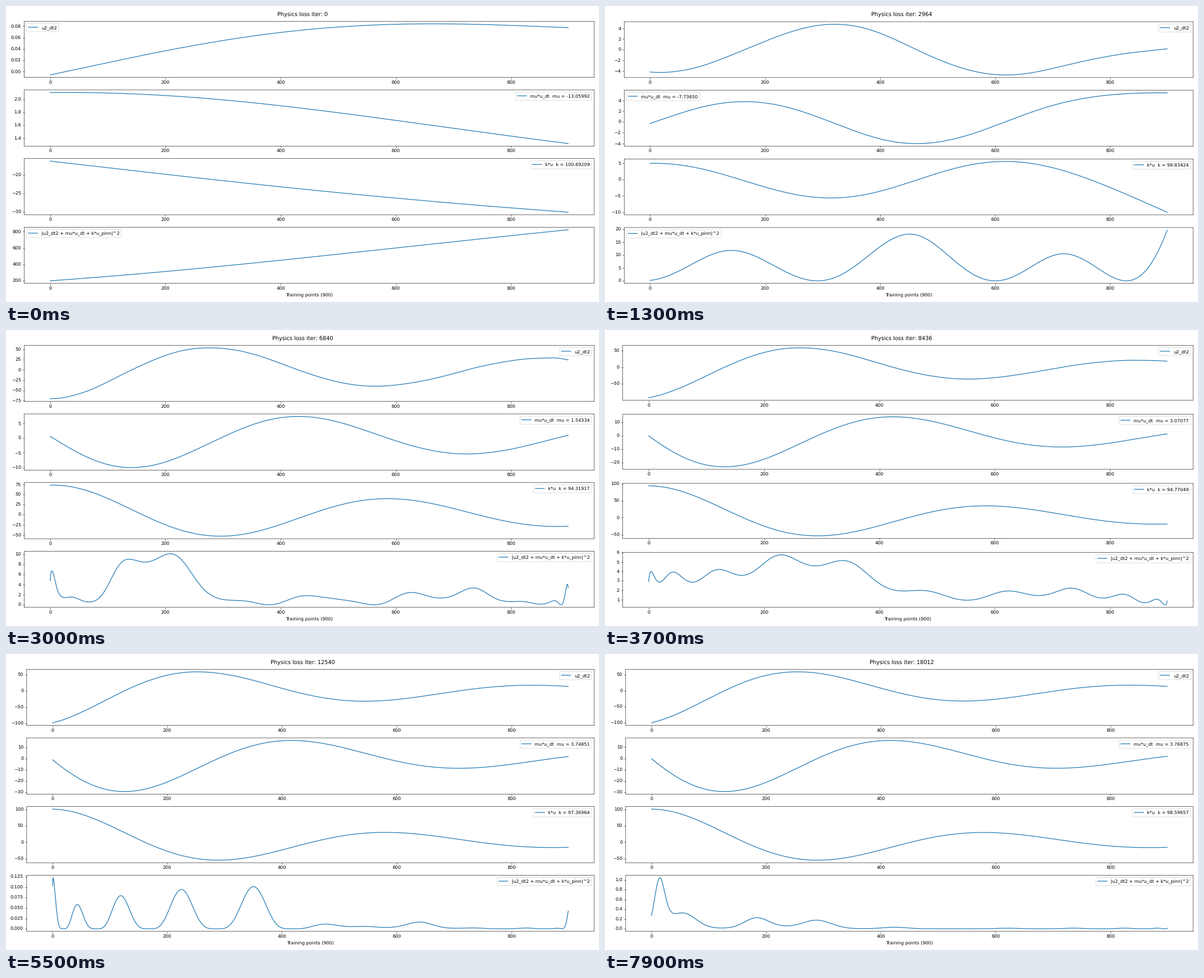
A matplotlib script for the animation above (8000 ms loop, 1058 by 529 pixels).

```python
import numpy as np
import matplotlib.pyplot as plt
from matplotlib.animation import FuncAnimation

plt.rcParams.update({
    "font.family": "DejaVu Sans", "text.hinting": "no_hinting",
    "path.snap": False, "axes.linewidth": .72,
    "xtick.major.width": .72, "ytick.major.width": .72})

FRAMES, INTERVAL = 80, 100
ITERS_PER_FRAME = 228
N = 900
X = np.arange(N)
T = X / (N - 1)

# Training stages: frame number with the learned coefficients
STAGES = [0, 13, 23, 37, 46, 65, 79]
MU = [-13.05992, -7.73650, -1.01132, 3.07077, 3.70352, 3.76739, 3.76875]
K = [100.69209, 99.83424, 94.12282, 94.77049, 96.31184, 98.16441, 98.59657]


def pchip(x, y, q):
    """Monotone cubic interpolation along axis 0, one row per query."""
    x, q = np.asarray(x, float), np.asarray(q, float)
    y = np.asarray(y, float).reshape(len(x), -1)
    h = np.diff(x)[:, None]
    d = np.diff(y, axis=0) / h
    same = d[:-1] * d[1:] > 0
    total = np.where(same, d[:-1] + d[1:], 1)
    inner = np.where(same, 2 * d[:-1] * d[1:] / total, 0)
    m = np.vstack([d[:1], inner, d[-1:]])
    j = np.clip(np.searchsorted(x, q, side="right") - 1, 0, len(x) - 2)
    s = (q - x[j])[:, None] / h[j]
    return ((1 + 2 * s) * (1 - s) ** 2 * y[j] + s * (1 - s) ** 2 * h[j] * m[j]
            + s ** 2 * (3 - 2 * s) * y[j + 1] + s ** 2 * (s - 1) * h[j] * m[j + 1])


def spline(*knots):
    """Natural cubic spline through (point, value) knots, at every point."""
    x, y = np.array(knots, float).T
    h = np.diff(x)
    slope = np.diff(y) / h
    mat, rhs = np.eye(len(x)), np.zeros(len(x))
    for i in range(1, len(x) - 1):
        mat[i, i - 1:i + 2] = h[i - 1], 2 * (h[i - 1] + h[i]), h[i]
        rhs[i] = 6 * (slope[i] - slope[i - 1])
    m = np.linalg.solve(mat, rhs)
    j = np.clip(np.searchsorted(x, X, side="right") - 1, 0, len(h) - 1)
    a, b = x[j + 1] - X, X - x[j]
    return ((m[j] * a ** 3 + m[j + 1] * b ** 3) / (6 * h[j])
            + (y[j] / h[j] - m[j] * h[j] / 6) * a
            + (y[j + 1] / h[j] - m[j + 1] * h[j] / 6) * b)


def bump(center, width, height):
    return height * np.exp(-((X - center) / width) ** 2 / 2)


def falloff(center, width):
    return 1 / (1 + np.exp((X - center) / width))


def spikes(left, right):
    """Short error spikes at both ends of the interval."""
    return left * np.exp(-X / 3.5) + right * np.exp((X - N + 1) / 5)


def solve(mu, k, force, u, v):
    """Runge-Kutta for u'' + mu u' + k u = force, all rows at once."""
    def acc(u, v, f):
        return f - mu * v - k * u

    h = 1 / (N - 1)
    us, vs = [u], [v]
    for i in range(N - 1):
        f0, f1 = force[:, [i]], force[:, [i + 1]]
        fm = (f0 + f1) / 2
        a1 = acc(u, v, f0)
        v2 = v + h / 2 * a1
        a2 = acc(u + h / 2 * v, v2, fm)
        v3 = v + h / 2 * a2
        a3 = acc(u + h / 2 * v2, v3, fm)
        v4 = v + h * a3
        a4 = acc(u + h * v3, v4, f1)
        u = u + h / 6 * (v + 2 * v2 + 2 * v3 + v4)
        v = v + h / 6 * (a1 + 2 * a2 + 2 * a3 + a4)
        us.append(u)
        vs.append(v)
    return np.hstack(us), np.hstack(vs)


# The network's error ripples evenly in the Chebyshev angle
ripple = np.cos(2 * np.pi * (np.arccos(1 - 2 * T) - .44) / .303)
crest = (1 + ripple) / 2

# Signed residual of the equation at each stage after the first
growing = spline((0, .4), (135, 3.42), (291, 0), (460, -4.23),
                 (600, 0), (716, 3.23), (828, 0), (899, -4.43))
undamped = .45 * ripple + spline(
    (0, 3.1), (45, -.1), (122, 3.25), (232, 3), (297, .35), (390, -2.3),
    (490, -4.05), (577, .1), (693, 1.6), (790, 1), (850, .1), (883, -.4),
    (899, -5))
damped = .15 * ripple + spline(
    (0, 1.85), (120, 1.9), (237, 2.27), (347, 2.1), (447, 1.42), (553, 1.12),
    (680, 1.35), (899, .8))
fitted = (crest * (.04 + falloff(420, 15) * (.28 - .19 * np.exp(-X / 90)))
          + bump(548, 25, .143) + bump(650, 30, .19) + spikes(.16, -.21))
refined = (crest * (.05 + falloff(470, 30) * (.23 + .00014 * X))
           + spikes(.49, -.29))
final = (bump(13, 11, .75) + bump(54, 33, .57) + bump(183, 30, .47)
         + bump(288, 36, .42) + bump(424, 30, .18)
         + .12 * crest * (1 - falloff(560, 20)))

frames = np.arange(FRAMES)
mu = pchip(STAGES, MU, frames)
k = pchip(STAGES, K, frames)
shapes = np.array([growing, undamped, damped, fitted, refined, final])
weights = np.array([np.interp(frames, STAGES[1:], row) for row in np.eye(6)])
force = weights.T @ shapes

u, v, a = (np.zeros((FRAMES, N)) for _ in range(3))

# Negative damping: integrate back from the right end
back = slice(13, 24)
end = pchip([13, 23], [(-.1, -.695), (-.568, .1)], frames[back])
ub, vb = solve(-mu[back], k[back], force[back, ::-1], end[:, :1], -end[:, 1:])
u[back], v[back] = ub[:, ::-1], -vb[:, ::-1]

# Later: integrate forward from the left end
ahead = slice(24, FRAMES)
start = pchip(STAGES[2:], [(.4495, .89), (.992, -.05), (1.033, -.4),
                           (1.034, -.13), (1.0245, -.05)], frames[ahead])
u[ahead], v[ahead] = solve(mu[ahead], k[ahead], force[ahead],
                           start[:, :1], start[:, 1:])
a[13:] = (force - mu * v - k * u)[13:]

# Untrained network, fading quickly into the first wave
curve = np.polyfit(T[[0, 200, 400, 600, 899]],
                   [-.0056, .0369, .0693, .0837, .0778], 4)
slope0 = np.polyint(curve, k=2.105 / MU[0])
value0 = np.polyint(slope0, k=-16.2 / K[0])
fade = (1 - frames[:13, None] / 13) ** 5
for arr, poly in ((u, value0), (v, slope0), (a, curve)):
    arr[:13] = fade * np.polyval(poly, T) + (1 - fade) * arr[13]

drag, spring = mu * v, k * u
panels = (a, drag, spring, (a + drag + spring) ** 2)

fig, axes = plt.subplots(4, 1, figsize=(18, 9), dpi=58.7778)
title = fig.suptitle("Physics loss iter: 0")
axes[-1].set_xlabel("Training points (900)")
names = ("u2_dt2", "mu*u_dt", "k*u", "|u2_dt2 + mu*u_dt + k*u_pinn|^2")
lines, labels = [], []
for ax, name, data in zip(axes, names, panels):
    lines += ax.plot(X, data[0], label=name)
    legend = ax.legend(loc="best")
    legend.set_in_layout(False)
    labels.append(legend.get_texts()[0])


def update(n):
    title.set_text(f"Physics loss iter: {n * ITERS_PER_FRAME}")
    labels[1].set_text(f"mu*u_dt  mu = {mu[n, 0]:.5f}")
    labels[2].set_text(f"k*u  k = {k[n, 0]:.5f}")
    for ax, line, data in zip(axes, lines, panels):
        line.set_ydata(data[n])
        ax.relim()
        ax.autoscale_view()
    # Start each layout from the default margins, so it depends on n alone
    fig.subplots_adjust(left=.125, right=.9, bottom=.11, top=.88, hspace=.2)
    fig.tight_layout()
    return lines


anim = FuncAnimation(fig, update, frames=FRAMES, interval=INTERVAL,
                     repeat=True, repeat_delay=0, blit=False)
plt.show()
```
